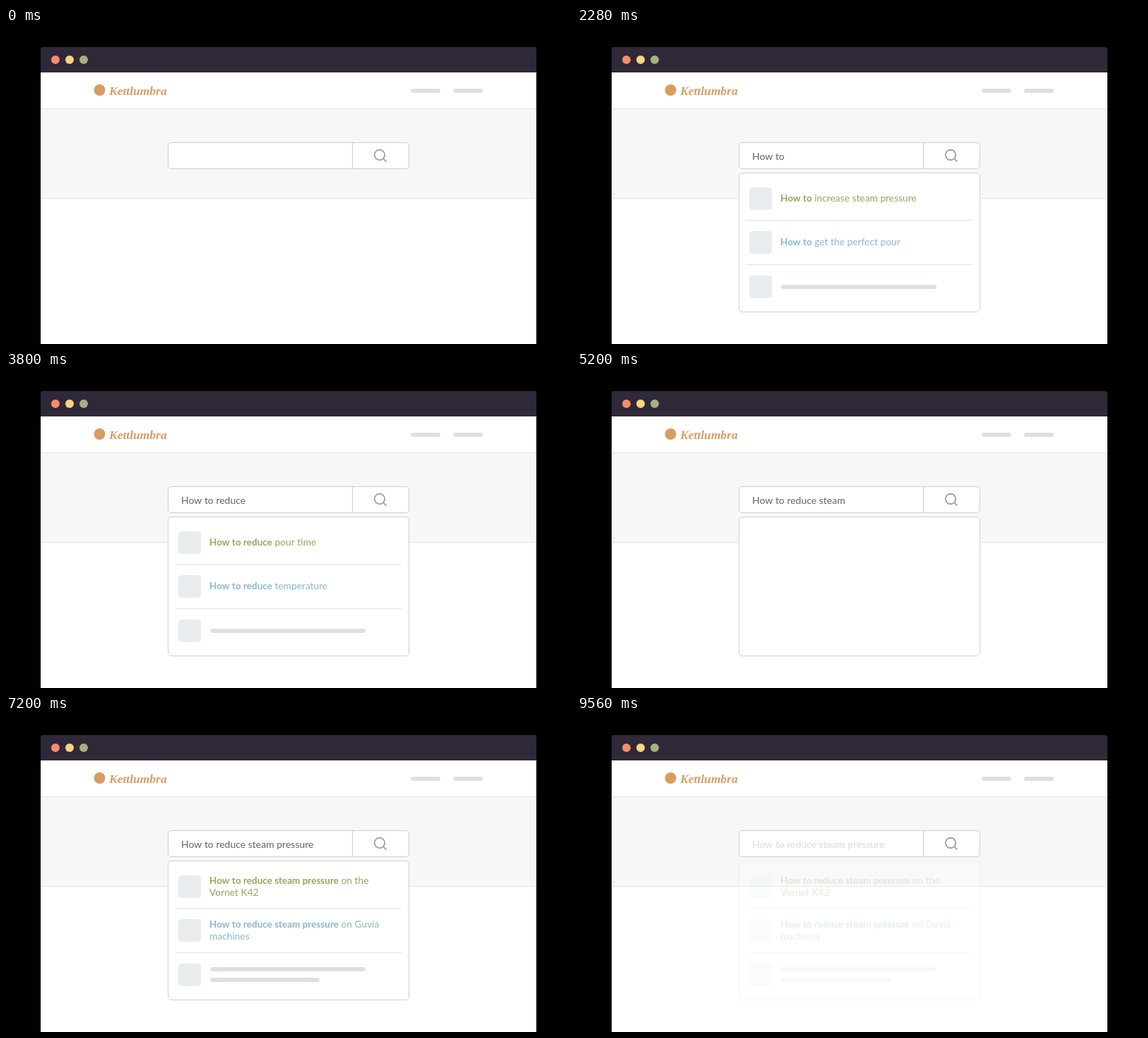
Recreate the animation shown at these times as an HTML page with a canvas. Size 800 by 448 pixels, loop 9600 ms.

```html
<!DOCTYPE html>
<html lang="en">
<head>
<meta charset="utf-8">
<title>Search suggestions</title>
<style>
  html, body { margin: 0; width: 100%; height: 100%; overflow: hidden; background: #000; }
  canvas { display: block; }
</style>
</head>
<body>
<canvas id="stage" width="800" height="448"></canvas>
<script>
const ctx = document.getElementById('stage').getContext('2d');
const LOOP = 9600, STEP = 40;
const FAMILY = 'Lato, "Open Sans", sans-serif';
const OLIVE = '#98a45d', TEAL = '#86bac3', BAR = '#dce0e4', EDGE = '#cdd2d3';

// Typed words: first and last moment of change
const words = [
  { text: 'How', from: 80, to: 400 },
  { text: ' to', from: 1520, to: 1680 },
  { text: ' reduce', from: 2920, to: 3360 },
  { text: ' steam', from: 4440, to: 4800 },
  { text: ' pressure', from: 6040, to: 6640 }
];

const full = [
  ['How to reduce steam pressure', ' on the', 'Vornet K42'],
  ['How to reduce steam pressure', ' on Guvia', 'machines']
];

// Suggestion lists, each swapped in between from and to
const lists = [
  { from: 0, to: 0, rows: [null, null] },
  { from: 2120, to: 2280, rows: [['How to', ' increase steam pressure'], ['How to', ' get the perfect pour']] },
  { from: 3600, to: 3800, rows: [['How to reduce', ' pour time'], ['How to reduce', ' temperature']] },
  { from: 5120, to: 5320, rows: full },
  { from: 7000, to: 7200, rows: full }
];

const clamp = v => Math.max(0, Math.min(1, v));

function rect(x, y, w, h, color) {
  ctx.fillStyle = color;
  ctx.fillRect(x, y, w, h);
}

function round(x, y, w, h, r, fill, stroke) {
  ctx.beginPath();
  ctx.roundRect(x, y, w, h, r);
  if (fill) { ctx.fillStyle = fill; ctx.fill(); }
  if (stroke) { ctx.strokeStyle = stroke; ctx.lineWidth = 1; ctx.stroke(); }
}

function disc(x, y, r, color) {
  ctx.beginPath();
  ctx.arc(x, y, r, 0, Math.PI * 2);
  ctx.fillStyle = color;
  ctx.fill();
}

function label(text, x, y, font, color) {
  ctx.font = font;
  ctx.fillStyle = color;
  ctx.fillText(text, x, y);
  return ctx.measureText(text).width;
}

function drawWindow() {
  rect(0, 0, 800, 448, '#000');
  rect(49, 60, 702, 388, '#fff');
  round(49, 27, 702, 36, [3, 3, 0, 0], '#2f2838');
  ['#f78b6c', '#f8d481', '#a4b180'].forEach((c, i) => disc(70 + i * 20, 45, 6, c));

  disc(132.5, 88, 8, '#d99c60');
  label('Kettlumbra', 146, 95, 'italic bold 17.5px "Liberation Serif", serif', '#d99c60');
  round(573, 86, 42, 6, 3, '#e0e0e0');
  round(633, 86, 42, 6, 3, '#e0e0e0');

  rect(50, 114, 700, 128, '#f6f8f8');
  rect(50, 114, 700, 1, '#dfe2e2');
  rect(50, 241, 700, 1, '#dfe2e2');
  rect(49, 63, 1, 385, '#e6e8e8');
  rect(750, 63, 1, 385, '#e6e8e8');
}

function drawSearch() {
  round(229.5, 162.5, 341, 37, 4.5, '#fff', '#c9cecf');
  rect(490, 163, 1, 37, '#c9cecf');
  ctx.strokeStyle = '#a0a6a7';
  ctx.lineWidth = 2;
  ctx.beginPath();
  ctx.arc(529, 180, 7.2, 0, Math.PI * 2);
  ctx.moveTo(534.2, 185.2);
  ctx.lineTo(538.6, 189.6);
  ctx.stroke();
}

function drawTyped(t, fade) {
  let before = '';
  ctx.font = '14px ' + FAMILY;
  ctx.fillStyle = '#5d656b';
  for (const { text, from, to } of words) {
    const letters = text.trim();
    const pace = (to - from + STEP) / letters.length;
    before += text.slice(0, text.length - letters.length);
    [...letters].forEach((ch, i) => {
      const x = 248 + ctx.measureText(before + ch).width - ctx.measureText(ch).width;
      ctx.globalAlpha = fade * clamp((t - from + STEP - i * pace) / pace);
      ctx.fillText(ch, x, 187);
      before += ch;
    });
  }
  ctx.globalAlpha = 1;
}

function drawRow(row, mid, color) {
  round(244, mid - 16, 32, 32, 4, '#e9edf0');
  if (!row) {
    round(289, mid - 3, 220, 6, 3, BAR);
    return;
  }
  const [strong, rest, second] = row;
  const base = mid + (second ? -4 : 4);
  const plain = '13.8px ' + FAMILY;
  const w = label(strong, 288, base, 'bold 13.5px ' + FAMILY, color);
  label(rest, 288 + w, base, plain, color);
  if (second) label(second, 288, base + 17, plain, color);
}

function drawList(rows) {
  drawRow(rows[0], 242, OLIVE);
  drawRow(rows[1], 304, TEAL);
  rect(240, 272, 320, 1, '#dfe2e3');
  rect(240, 335, 320, 1, '#dfe2e3');
  if (rows === full) {
    round(244, 351, 32, 32, 4, '#e9edf0');
    round(289, 356, 220, 6, 3, BAR);
    round(289, 371, 155, 6, 3, BAR);
  } else {
    drawRow(null, 367);
  }
}

function drawPanel(t, fade) {
  const shown = fade * clamp((t - 960) / 80);
  if (!shown) return;
  ctx.globalAlpha = shown;
  round(229.5, 205.5, 341, 197, 4.5, '#fff', EDGE);

  // Fade the old list out, then the new one in
  let n = 0;
  while (n + 1 < lists.length && t >= lists[n + 1].from + 80) n++;
  const { from, to, rows } = lists[n];
  const next = lists[n + 1];
  let alpha = n ? clamp((t - from - 80) / (to - from - 80)) : 1;
  if (next) alpha *= 1 - clamp((t - next.from + STEP) / 120);
  ctx.globalAlpha = shown * alpha;
  if (alpha > 0) drawList(rows);
  ctx.globalAlpha = 1;
}

function frame(now) {
  const t = Math.floor((now % LOOP) / STEP) * STEP;
  const fade = Math.pow(clamp((LOOP - t) / 120), 1.3);
  drawWindow();
  drawSearch();
  drawTyped(t, fade);
  drawPanel(t, fade);
}

let start = null;
function tick(now) {
  if (start === null) start = now;
  frame(now - start);
  requestAnimationFrame(tick);
}
frame(0);
requestAnimationFrame(tick);
</script>
</body>
</html>
```
